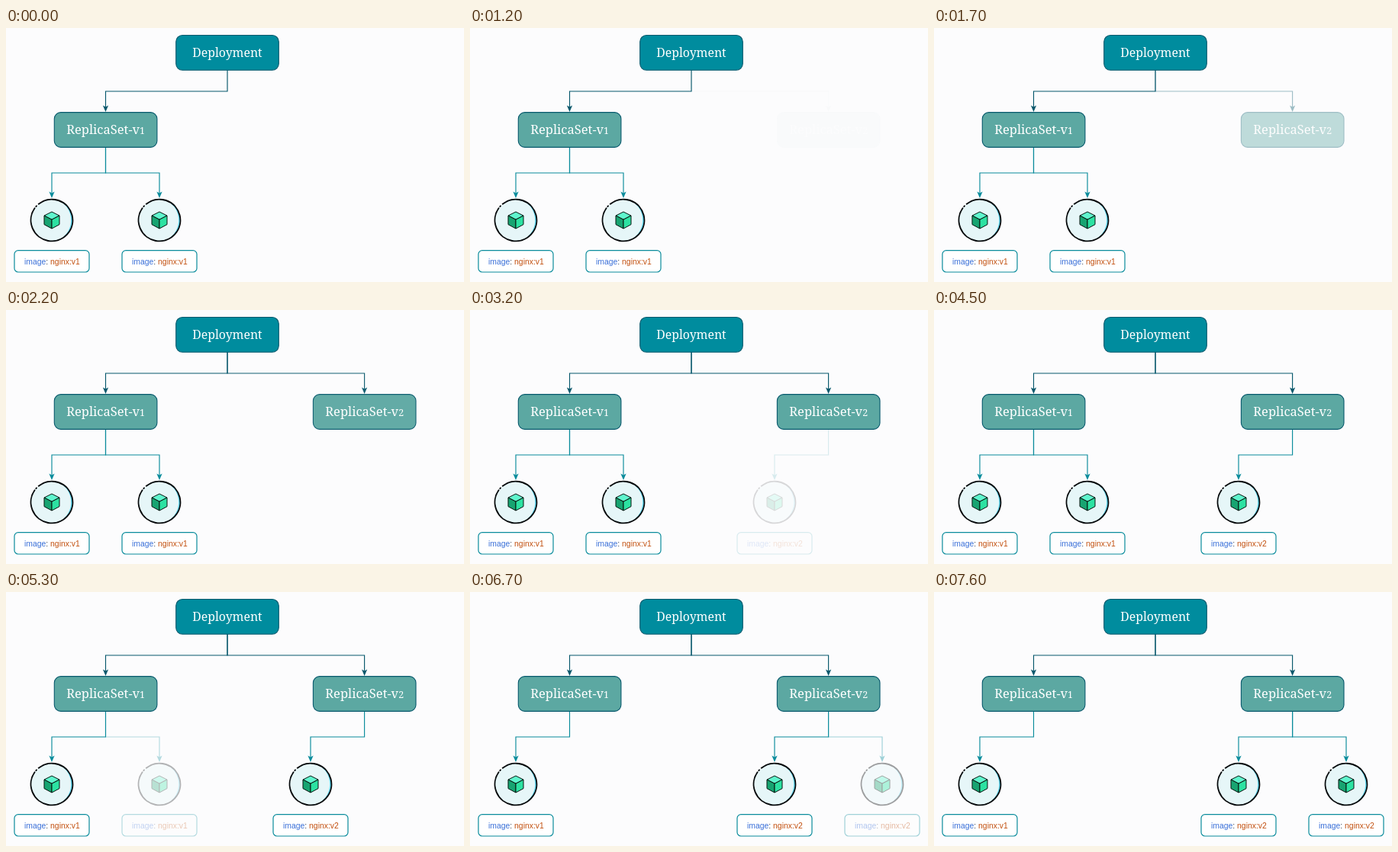
Recreate the animation shown at these times as an HTML page. Size 600 by 333 pixels, loop 8000 ms.

```html
<!DOCTYPE html>
<html lang="en">
<head>
<meta charset="utf-8">
<title>Rolling update</title>
<style>
  html, body { margin: 0; width: 100%; height: 100%; overflow: hidden; background: #fcfcfd; }
  svg { display: block; width: 600px; height: 333px; }
  .title { font-family: "Noto Serif", serif; fill: #fff; text-anchor: middle; }
  .tag { font: 10.4px "Liberation Sans", Arial, sans-serif; fill: #c2500f; text-anchor: middle; }
  .key { fill: #3a70d8; }
  .colon { fill: #3c4658; }
</style>
</head>
<body>
<svg id="stage" viewBox="0 0 600 333" xmlns="http://www.w3.org/2000/svg"></svg>
<script>
const LOOP = 8000, STEP = 100, FADE = 1600;
const DARK = "#07586c", TEAL = "#0a8c9c";

const arrow = (x, y, color) =>
  `<path d="M${x} ${y}l-3.6 -8.4l3.6 2l3.6 -2z" fill="${color}"/>`;

// Elbow connector: down, across, down to an arrow tip.
const link = (x1, y1, mid, x2, y2, color) =>
  `<path d="M${x1} ${y1}V${mid}H${x2}V${y2 - 5}" fill="none" stroke="${color}" stroke-width="1.15"/>` +
  arrow(x2, y2, color);

const box = (cx, y, fill, text, size) =>
  `<rect x="${cx - 67.3}" y="${y}" width="134.6" height="45.8" rx="8.5" fill="${fill}" stroke="${DARK}" stroke-width="1.1"/>
   <text class="title" x="${cx}" y="${y + 28.4}" font-size="${size}">${text}</text>`;

const replicaSet = (cx, n) =>
  box(cx, 110.6, "#5ca8a2", `ReplicaSet-v<tspan font-size="12.4">${n}</tspan>`, 16.5);

const onCircle = (r, deg) => {
  const a = deg * Math.PI / 180;
  return `${(r * Math.cos(a)).toFixed(2)} ${(r * Math.sin(a)).toFixed(2)}`;
};

const arc = (from, to) =>
  `<path d="M${onCircle(27.4, from)}A27.4 27.4 0 ${to - from > 180 ? 1 : 0} 1 ${onCircle(27.4, to)}" fill="none" stroke="#06090b" stroke-width="1.9" stroke-linecap="round"/>`;

const cube = `<g stroke="#07140f" stroke-width="1" stroke-linejoin="round">
  <path d="M0 -11L10 -6L0 -0.8L-10 -6z" fill="#5ff5cd"/>
  <path d="M-10 -6L0 -0.8V11L-10 5.6z" fill="#17a471"/>
  <path d="M10 -6L0 -0.8V11L10 5.6z" fill="#2ce2a2"/></g>`;

const icon = (cx, cy) => `<g transform="translate(${cx} ${cy})">
  <circle r="27.4" fill="#e6f6f8"/>
  <path d="M${onCircle(27, -62)}A27 27 0 0 1 ${onCircle(27, 62)}A29 29 0 0 0 ${onCircle(27, -62)}z" fill="#5bd3ec"/>
  ${arc(-129, 215)}${arc(221, 223)}${cube}</g>`;

const pod = (x, n, trunk) => link(trunk, 157, 190, x, 223, TEAL) + icon(x, 252) +
  `<rect x="${x - 49}" y="291.6" width="98" height="28.4" rx="5" fill="#fff" stroke="${TEAL}" stroke-width="1.2"/>
   <text class="tag" x="${x + 0.4}" y="309.8"><tspan class="key">image</tspan><tspan class="colon">:</tspan> nginx:v${n}</text>`;

const group = (id, body) => `<g id="${id}">${body}</g>`;

document.getElementById("stage").innerHTML =
  group("set2", link(290, 55, 83, 469.6, 110, DARK) + replicaSet(469.7, 2)) +
  link(290, 55, 83, 130.5, 110, DARK) +
  box(290, 9.5, "#008c9e", "Deployment", 15.8) +
  replicaSet(130.6, 1) +
  group("oldPod", pod(201, 1, 130.5)) +
  pod(60, 1, 130.5) +
  group("newPod2", pod(540, 2, 469.6)) +
  group("newPod1", pod(399, 2, 469.6));

// id, start of fade, fading out
const fades = [
  ["set2", 970, false],
  ["newPod1", 2670, false],
  ["oldPod", 4370, true],
  ["newPod2", 5970, false]
].map(([id, start, out]) => ({ el: document.getElementById(id), start, out }));

const ease = t => t < 0.5 ? 4 * t ** 3 : 1 - 4 * (1 - t) ** 3;

function draw(now) {
  const time = Math.floor((now % LOOP) / STEP) * STEP;
  for (const { el, start, out } of fades) {
    const p = ease(Math.min(1, Math.max(0, (time - start) / FADE)));
    el.setAttribute("opacity", (out ? 1 - p : p).toFixed(3));
  }
}

let origin;
function tick() {
  const now = performance.now();
  origin ??= now;
  draw(now - origin);
  requestAnimationFrame(tick);
}
tick();
</script>
</body>
</html>
```
